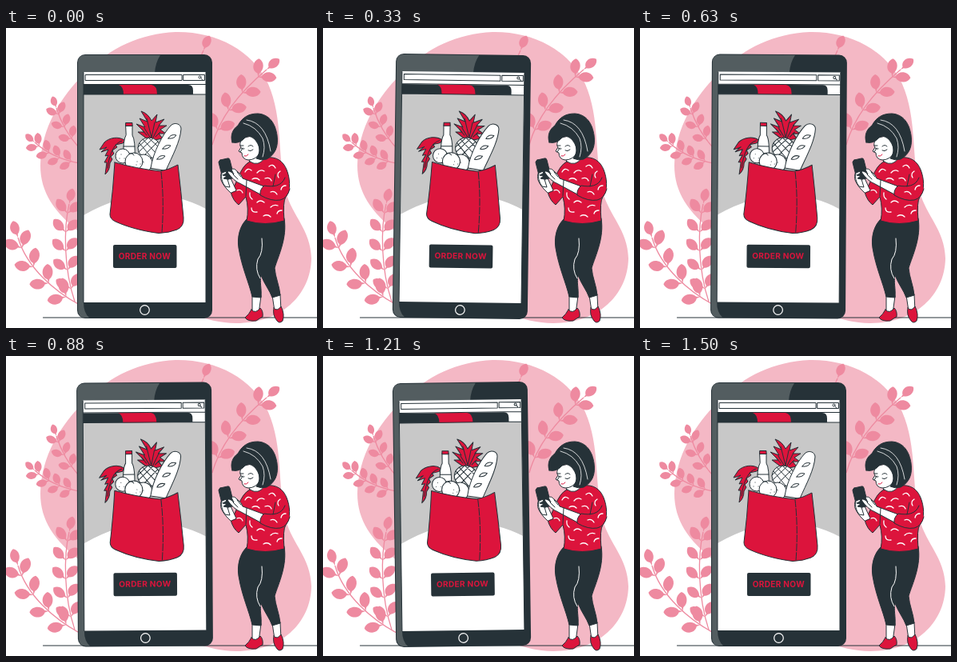
These frames come from a looping animation (389 by 375 pixels, 1.54 s). An HTML page:

```html
<!DOCTYPE html>
<html lang="en">
<head>
<meta charset="utf-8">
<title>Order now</title>
<style>
  html, body { margin: 0; width: 100%; height: 100%; overflow: hidden; background: #fff; }
  svg { display: block; width: 389px; height: 375px; }
  .dark { fill: #263238; }
  .red { fill: #dc143c; }
  .white { fill: #fff; }
  .ink { stroke: #263238; stroke-width: 1; stroke-linecap: round; stroke-linejoin: round; }
  .line { fill: none; stroke-linecap: round; stroke-linejoin: round; }
  .light { stroke: #fff; }
  #sprigs { fill: #ee8aa0; stroke: #ee8aa0; }
  #sprigs .stem { fill: none; stroke-width: 1.3; }
  #sprigs .leaf { stroke: none; }
  text { font: 700 10.1px Inter, Roboto, sans-serif; letter-spacing: .3px; text-anchor: middle; }
</style>
</head>
<body>
<svg viewBox="0 0 389 375">
  <path fill="#f4b8c5" d="M212 5C262 4 308 27 328 70C347 114 339 160 350 205C358 235 381 252 382 288C381 335 343 369 288 369C210 368 150 300 93 256C60 230 43 205 43 172C44 125 68 86 100 55C130 25 168 7 212 5Z"/>
  <g id="sprigs"></g>
  <path class="ink" d="M46.500 362H389"/>

  <g id="phone">
    <rect class="dark" x="89" y="33" width="169" height="330" rx="10"/>
    <path fill="#535d60" d="M99 34H193Q187 43 186 56H97V343Q97 356 104 362H99Q90 362 90 352V43Q90 34 99 34Z"/>
    <path class="white" d="M97 55H250V343H97Z"/>
    <path fill="#c8c8c8" d="M97 83H250V226Q178 188 97 234Z"/>
    <g class="ink white">
      <path d="M99.500 58.500H220V65.500H99.500ZM222 58.500H248.500V65.500H222Z"/>
      <circle cx="242.500" cy="61.500" r="1.500"/>
      <path d="M244 63L245.500 64.500"/>
    </g>
    <path class="dark" d="M97 71H228Q234 71 234 78V83H97Z"/>
    <path class="red" d="M141 71H182Q189 72 189 83H147Q147 73 141 71Z"/>
    <path class="ink line" d="M97 70.500H250M97 83H250M97 55.500V343M250 55.500V343"/>

    <g class="ink">
      <path class="red" d="M148 140C141 135 129 137 123 143L117 152Q122 151 126 149L119 155L128 152L124 160L128 159L123 168L126 168L124 183Q130 178 130 169L133 164L131 161L135 157L133 153L139 149L137 146L146 144Z"/>
      <path class="line" d="M145 141Q131 145 127 175"/>
      <path class="white" d="M150 121H158V134Q162 140 161 165H147Q146 140 150 134Z"/>
      <path class="red" d="M150 118.500H158V122.500H150Z"/>
      <path class="line" d="M147 148H161"/>
      <path class="red" d="M177 139L165 130L173 130L163 120L174 124L167 113L177 117L169 104Q178 107 182 116L189 108L187 118L198 114L191 122L201 122L193 127L200 132L191 132L196 138L186 140Z"/>
      <path class="line" d="M181 138L173 125M182 137L176 113M182 137L186 118M184 137L192 121M176 134L170 127M187 136L193 130"/>
      <ellipse class="white" cx="179" cy="150" rx="14" ry="13"/>
      <path class="line" d="M167 144L182 162M171 139L190 159M178 137L193 151M190 142L171 161M184 138L166 155M177 138L165 149"/>
      <circle class="white" cx="146" cy="160" r="9"/>
      <circle class="white" cx="172" cy="169" r="11"/>
      <circle class="white" cx="160" cy="167" r="11"/>
      <path class="line" d="M160 159Q158 156 154 157M164 167h.1M168 170h.1M163 171h.1M144 158h.1M148 163h.1M172 168h.1M142 163h.1"/>
      <path class="white" d="M181 175C184 155 196 133 206 122C211 117 219 120 219 126C218 142 208 160 200 178Z"/>
      <path class="line" d="M203 138Q206 132 213 134Q210 139 203 138ZM196 151Q199 145 206 147Q203 152 196 151ZM189 164Q192 158 199 160Q196 165 189 164Z"/>
      <path class="red" d="M136 168C153 173 174 177 193 179Q204 177 215 171Q219 205 222 237Q223 248 214 252Q204 256 191 256.500C170 254 150 248 137 242Q130 239 130 233Q134 202 136 168Z"/>
      <path class="line" d="M194 180Q198 215 195 256" stroke-dasharray="9 2"/>
    </g>

    <rect class="dark" x="134" y="271" width="79.500" height="29" rx="2"/>
    <text class="red" x="173.300" y="288.500">ORDER NOW</text>
    <circle class="line light" cx="173.500" cy="352.500" r="5.800" stroke-width="1.200"/>
  </g>

  <g class="ink">
    <path class="white" d="M308 334L308 354L316 357L319 335ZM333 334L336 354L344 354L343 333Z"/>
    <path class="red" d="M307 352Q312 358 318 350Q322 354 321 361Q317 363 313 366Q302 367 299 362Q304 358 307 352Z"/>
    <path class="red" d="M335 350Q339 355 344 348Q349 358 346 366Q342 370 339 366Q333 359 335 350Z"/>
    <path class="dark" d="M302 238C292 247 289 262 291 275C295 300 304 318 308 336L319 337C320 325 317 318 319 309C323 320 330 328 333 337L343 334C342 322 337 312 336 300C341 284 352 262 348 238Z"/>
    <path class="line light" d="M320 263Q322 281 315 289Q311 302 318 313"/>

    <path class="white" d="M303 160L306 173Q316 177 325 168L320 153Z"/>
    <path class="red" d="M305 167Q316 174 324 162C339 160 347 167 351 177C355 187 357 202 350 211Q346 217 348 241Q324 248 301 241Q304 226 300 211L291 221Q284 216 281 205C289 196 292 173 305 167Z"/>
    <path class="white" d="M281 206Q272 198 269 190Q267 180 273 178L282 190L288 203Z"/>
    <path class="dark" d="M268 165L277 163Q279 162 280 165L285 185Q285 188 283 188L274 190Q272 190 271 188L266 168Q266 166 268 165Z"/>
    <path class="white" d="M270 181L276 179L275 182L271 184L276 185L272 188L277 189L280 199L274 198Q268 190 270 181Z"/>
    <path class="white" d="M320 209L294 195Q284 191 277 180Q279 177 285 183L282 177Q285 174 290 180Q295 183 296 188L323 198Z"/>
    <path class="line" d="M284 183L290 189M289 180L294 186"/>
    <path class="red" d="M349 187C345 198 334 199 323 197Q317 202 318 209Q332 217 343 215Q352 213 355 201"/>
    <path class="line" d="M301 190L300 210M337 183L334 198"/>
    <path class="line light" stroke-width="1.300" d="M299 180Q302 174 307 178M314 181q4 -5 9 -2M329 173q5 -4 8 2M343 179q-5 3 -2 8M324 188q6 -2 8 3M308 189q5 -3 9 1M289 203q5 -2 7 3M305 206q-1 5 3 8M314 218q4 -4 9 0M331 205q5 -2 8 3M344 202q1 -5 6 -5M331 224q4 -4 9 -2M307 225q0 6 7 5M322 235q5 -3 9 1M339 232q1 -4 6 -4"/>

    <path class="white" d="M295 138Q291 146 294 149L291 154L295 156Q295 164 303 165Q312 165 318 156L314 134Z"/>
    <path class="line" d="M293 147l4 0M303 148Q306 145 309 148M294 150Q296 152 298 151M303 153Q306 155 309 152M296 150l-3 5"/>
    <path class="line" stroke="#dc143c" d="M298 160Q301 161 303 158"/>
    <path class="dark" d="M283 143C280 134 284 126 290 122C296 111 304 107 315 107C330 108 337 120 339 134C341 148 337 158 326 164Q319 166 313 163C319 155 318 147 311 139Q303 132 298 138Q292 145 283 143Z"/>
    <path class="line light" stroke-width=".8" d="M297 119Q313 123 321 138Q325 149 321 161M301 115Q325 118 331 154"/>
  </g>
</svg>
<script>
  const NS = 'http://www.w3.org/2000/svg';
  const sprigs = document.getElementById('sprigs');
  const phone = document.getElementById('phone');

  function addPath(attrs) {
    const path = document.createElementNS(NS, 'path');
    for (const name in attrs) path.setAttribute(name, attrs[name]);
    return sprigs.appendChild(path);
  }

  function addLeaf({ x, y }, angle, size) {
    addPath({
      class: 'leaf',
      d: 'M0 0L.2 -.05C.35 -.4 .85 -.35 1 0C.85 .32 .4 .32 .2 .05Z',
      transform: `translate(${x} ${y}) rotate(${angle}) scale(${size})`
    });
  }

  // A stem with pairs of leaves and one more at the tip.
  function addSprig(d, pairs, size) {
    const stem = addPath({ class: 'stem', d });
    const length = stem.getTotalLength();
    const heading = s => {
      const a = stem.getPointAtLength(s - 1), b = stem.getPointAtLength(s);
      return Math.atan2(b.y - a.y, b.x - a.x) * 180 / Math.PI;
    };
    for (let i = 1; i <= pairs; i++) {
      const s = length * (i - .3) / (pairs + .2);
      const point = stem.getPointAtLength(s);
      for (const side of [-1, 1]) addLeaf(point, heading(s) + side * 45, size);
    }
    addLeaf(stem.getPointAtLength(length), heading(length), size * .9);
  }

  addSprig('M258 146C267 113 290 82 326 52', 4, 23);
  addSprig('M225 70Q240 45 247 28', 0, 22);
  addSprig('M90 148Q72 128 63 100', 3, 17);
  addSprig('M92 169Q58 163 36 143', 4, 17);
  addSprig('M86 342C72 300 72 250 79 220', 5, 22);
  addSprig('M92 346C62 330 26 300 15 262', 4, 24);

  const LOOP = 1540, STEPS = 37, QUARTER = 9;

  // Linear swing: 0 to 1 to -1 and back to 0 degrees.
  function swing(step) {
    if (step <= QUARTER) return step / QUARTER;
    if (step <= 3 * QUARTER) return 2 - step / QUARTER;
    return step / QUARTER - 4;
  }

  function draw() {
    const step = Math.floor(performance.now() % LOOP / LOOP * STEPS);
    phone.setAttribute('transform', `rotate(${swing(step)} 173.5 198)`);
    requestAnimationFrame(draw);
  }
  draw();
</script>
</body>
</html>
```
